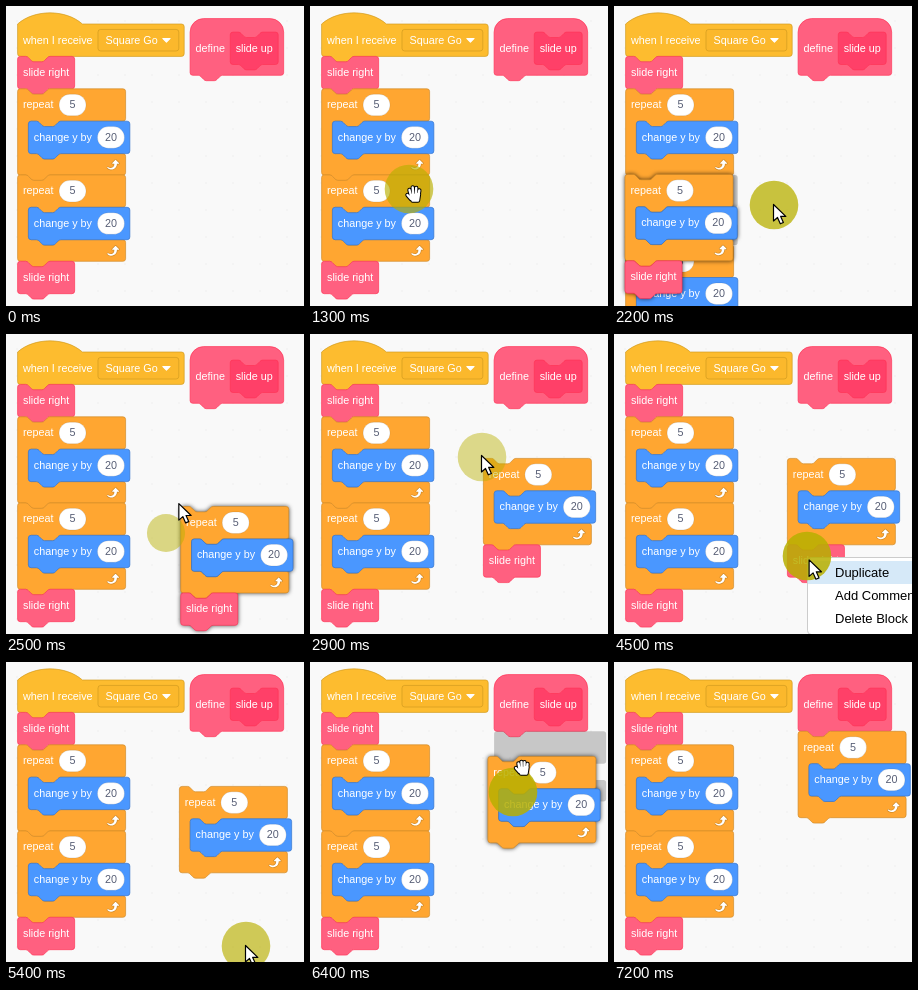
An HTML page for the animation above (9100 ms loop, 298 by 300 pixels).

```html
<!DOCTYPE html>
<html lang="en">
<head>
<meta charset="utf-8">
<title>Block editor</title>
<style>
  html, body { margin: 0; width: 100%; height: 100%; overflow: hidden; background: #f9f9f9; }
  svg { display: block; width: 298px; height: 300px; }
  text { font-family: "Liberation Sans", Arial, sans-serif; font-size: 16px; fill: #fff; }
  .value { fill: #575e75; text-anchor: middle; }
  .menu text { font-size: 13px; fill: #000; }
  .lifted { filter: drop-shadow(0 0 3.5px rgba(0, 0, 0, .7)); }
</style>
</head>
<body>
<svg id="stage" viewBox="0 0 298 300"></svg>
<script>
const LOOP = 9100, STEP = 100, SCALE = 0.675;
const stage = document.getElementById('stage');

const COLORS = {
  event: ['#fdbc2f', '#cf9a20'],
  control: ['#ffa631', '#d08a28'],
  motion: ['#4a97ff', '#3373cc'],
  custom: ['#ff6080', '#ff3355'],
  proto: ['#ff4068', '#ff3355']
};

function add(parent, tag, attrs = {}, content) {
  const el = document.createElementNS('http://www.w3.org/2000/svg', tag);
  for (const key in attrs) el.setAttribute(key, attrs[key]);
  if (content !== undefined) el.textContent = content;
  parent.appendChild(el);
  return el;
}

const place = (el, x, y, scale = 1) =>
  el.setAttribute('transform', `translate(${x} ${y}) scale(${scale})`);
const show = (el, on) => el.setAttribute('visibility', on ? 'visible' : 'hidden');

// Outlines, in unscaled block units
const NOTCH = 'c2 0 3 1 4 2 l4 4 c1 1 2 2 4 2 h12 c2 0 3 -1 4 -2 l4 -4 c1 -1 2 -2 4 -2';
const BUMP = 'c-2 0 -3 1 -4 2 l-4 4 c-1 1 -2 2 -4 2 h-12 c-2 0 -3 -1 -4 -2 l-4 -4 c-1 -1 -2 -2 -4 -2';
const TOP = `M0 4 A4 4 0 0 1 4 0 H12 ${NOTCH}`;
const side = (w, h) => `H${w - 4} a4 4 0 0 1 4 4 v${h - 8} a4 4 0 0 1 -4 4`;
const BOTTOM = `H48 ${BUMP} H4 a4 4 0 0 1 -4 -4 Z`;

const plainPath = w => `${TOP} ${side(w, 48)} ${BOTTOM}`;
const hatPath = w => `M0 0 c25 -22 71 -22 96 0 ${side(w, 48)} ${BOTTOM}`;
const definePath = (w, h) =>
  `M0 20 a20 20 0 0 1 20 -20 H${w - 20} a20 20 0 0 1 20 20 V${h - 4} a4 4 0 0 1 -4 4 ${BOTTOM}`;
const loopPath = (w, inner) =>
  `${TOP} ${side(w, 48)} H64 ${BUMP} h-8 a4 4 0 0 0 -4 4 v${inner - 8} a4 4 0 0 0 4 4 h8 ` +
  `${NOTCH} ${side(w, 32)} ${BOTTOM}`;

const ARROW_EDGE = 'M23.3 11c-.3 .6-.9 1-1.5 1h-1.6c-.1 1.3-.5 2.5-1.1 3.6c-.9 1.7-2.3 3.2-4.1 4.1' +
  'c-1.7 .9-3.6 1.2-5.5 .9c-1.8-.3-3.5-1.1-4.9-2.3c-.7-.7-.7-1.9 0-2.6c.6-.6 1.6-.7 2.3-.2' +
  'c.9 .6 1.9 .9 2.9 .9s1.9-.3 2.7-.9c1.1-.8 1.8-2.1 1.8-3.5h-1.5c-.9 0-1.7-.7-1.7-1.7' +
  'c0-.4 .2-.9 .5-1.2l4.4-4.4c.7-.6 1.7-.6 2.4 0L23 9.2z';
const ARROW = 'M21.8 11h-2.6c0 1.5-.3 2.9-1 4.2c-.8 1.6-2.1 2.8-3.7 3.6c-1.5 .8-3.3 1.1-4.9 .8' +
  'c-1.6-.2-3.2-1-4.4-2.1c-.9-.9 .1-2.1 1.1-1.3c1 .7 2.2 1.1 3.4 1.1s2.3-.3 3.3-1' +
  'c.9-.6 1.6-1.5 2-2.6c.3-.9 .4-1.8 .2-2.8h-2.4c-.7 0-.9-.7-.5-1.1l4.4-4.4' +
  'c.3-.3 .7-.3 .9 0L22 9.8c.5 .5 .2 1.2-.2 1.2z';

function block(parent, x, y, path, color) {
  const g = add(parent, 'g');
  place(g, x, y);
  add(g, 'path', { d: path, fill: COLORS[color][0], stroke: COLORS[color][1] });
  return g;
}

function label(g, str, x = 8, y = 29) {
  add(g, 'text', { x, y }, str);
}

function pill(g, x, value) {
  add(g, 'rect', { x, y: 8, width: 40, height: 32, rx: 16, fill: '#fff', stroke: '#00000026' });
  add(g, 'text', { x: x + 20, y: 29, class: 'value' }, value);
}

function slideBlock(parent, y) {
  const g = block(parent, 0, y, plainPath(84.5), 'custom');
  label(g, 'slide right');
  return g;
}

function repeatBlock(parent, y) {
  const g = block(parent, 0, y, loopPath(160, 48), 'control');
  label(g, 'repeat');
  pill(g, 61.4, 5);
  const icon = add(g, 'g');
  place(icon, 128, 100);
  add(icon, 'path', { d: ARROW_EDGE, fill: COLORS.control[1] });
  add(icon, 'path', { d: ARROW, fill: '#fff' });
  const inner = block(g, 16, 48, plainPath(150.3), 'motion');
  label(inner, 'change y by');
  pill(inner, 102.3, 20);
}

function group(x, y) {
  const g = add(stage, 'g');
  place(g, x, y, SCALE);
  return g;
}

function marker(x, y) {
  const g = group(x, y);
  add(g, 'path', { d: loopPath(166, 24), fill: '#000', opacity: 0.2 });
  return g;
}

function menu(x, y, items) {
  const g = add(stage, 'g', { class: 'menu' });
  place(g, x, y);
  add(g, 'rect', { x: .5, y: .5, width: 208, height: 77, rx: 4, fill: '#fff', stroke: '#ccc' });
  const bar = add(g, 'rect', { x: 1, width: 207, height: 23, fill: '#d6e9f8' });
  items.forEach((item, i) => add(g, 'text', { x: 28, y: 20 + 23 * i }, item));
  return { g, bar, y };
}

// Workspace grid
for (let x = 11; x < 298; x += 27)
  for (let y = 15; y < 300; y += 27)
    add(stage, 'path', { d: `M${x - 1} ${y} h2`, stroke: '#efefef' });

// Main script
const LEFT = 11.6, SPLIT = 168.9;
const main = group(LEFT, 18);
const hat = block(main, 0, 0, hatPath(246.8), 'event');
label(hat, 'when I receive');
add(hat, 'rect', { x: 119.1, y: 8, width: 119.7, height: 32, rx: 4, fill: '#fbb82c', stroke: '#cf9a20' });
label(hat, 'Square Go', 130.3);
add(hat, 'path', {
  d: 'M215 21.5 h11 l-5.5 5.5 z', fill: '#fff', stroke: '#fff', 'stroke-width': 1.5, 'stroke-linejoin': 'round'
});
slideBlock(main, 48);
repeatBlock(main, 96);

const gap = marker(LEFT, SPLIT);
const lower = group(LEFT, SPLIT);
repeatBlock(lower, 0);
slideBlock(lower, 128);

// Definition
const define = group(184.1, 12.6);
const head = block(define, 0, 0, definePath(138.6, 84), 'custom');
label(head, 'define', 8, 49);
label(block(head, 59.5, 20, plainPath(71), 'proto'), 'slide up');
const slot = marker(184.1, 69.3);

// Duplicated blocks
const copy = group(0, 0);
repeatBlock(copy, 0);
const copyTail = slideBlock(copy, 128);

const menus = [
  { ...menu(99, 183, ['Duplicate', 'Add Comment', 'Delete 2 Blocks']), from: 1400, to: 2100 },
  { ...menu(193, 223, ['Duplicate', 'Add Comment', 'Delete Block']), from: 4400, to: 5400 }
];

const ripple = add(stage, 'circle', { fill: '#b8b000' });

const pointer = add(stage, 'g');
const arrow = add(pointer, 'path', {
  d: 'M-.5 -.5 V16 L3.5 12.5 L6.3 18.8 L9.4 17.5 L6.7 11.4 H11.8 Z',
  fill: '#fff', stroke: '#000', 'stroke-width': 1.2, 'stroke-linejoin': 'round'
});

function hand(d) {
  const g = add(pointer, 'g', { transform: 'translate(5 5)', 'stroke-linecap': 'round', 'stroke-linejoin': 'round' });
  for (const [color, width] of [['#000', 4.4], ['#fff', 2.4]])
    add(g, 'path', { d, fill: color, stroke: color, 'stroke-width': width });
  return g;
}
const PALM = 'M-3 1 L5 0 L4 6.5 H-1.5 Z M-3 5 L-6.5 1';
const openHand = hand(PALM + ' M-3 2 L-4.5 -4 M-.8 0 L-1.3 -6.5 M2 0 L2.2 -6 M4.5 1 L5.3 -3.5');
const fist = hand(PALM + ' M-3 2 L-4 -3.5 M-.8 0 L-1 -5 M2 0 V-4.7 M4.5 1 L5 -3');

// Pointer stops: time, x, y
const STOPS = [
  [500, 290, 282], [1200, 99, 183], [1400, 99, 183], [1900, 160, 199], [2300, 160, 199],
  [2600, 178, 160], [2800, 172, 122], [3000, 172, 122], [3600, 193, 223], [4400, 193, 223],
  [5100, 240, 284], [5400, 240, 284], [5900, 203, 130], [6200, 203, 130], [6300, 205, 115],
  [6400, 207.5, 100], [6600, 213, 78], [6700, 213, 78], [7200, 330, 95]
];
// Presses: time, x, y
const PRESSES = [
  [1200, 99, 183], [2050, 160, 199], [2900, 172, 123], [4300, 193, 222], [5300, 240, 284], [6200, 203, 130]
];

const within = (t, from, to) => t >= from && t < to;

function pointerAt(t) {
  const i = STOPS.findIndex(s => s[0] > t);
  if (i < 1) return STOPS[i < 0 ? STOPS.length - 1 : 0].slice(1);
  const [t0, x0, y0] = STOPS[i - 1], [t1, x1, y1] = STOPS[i];
  const p = (t - t0) / (t1 - t0), e = p * p * (3 - 2 * p);
  return [x0 + (x1 - x0) * e, y0 + (y1 - y0) * e];
}

function copyAt(t, x, y) {
  if (t < 2400) return [11, 168.4];
  if (t < 2900) return [x + 1.4, y + 2.4];
  if (t < 6200) return [173.4, 124.4];
  if (t < 6700) return [x - 29.6, y - 5.6];
  return [184.1, 69.3];
}

function draw(time) {
  const t = Math.floor((time % LOOP) / STEP) * STEP;
  const [x, y] = pointerAt(t);

  const pushed = within(t, 2200, 2400);
  show(gap, pushed);
  place(lower, LEFT, SPLIT + (pushed ? 70.2 : 0), SCALE);
  show(slot, within(t, 6300, 6700));

  show(copy, t >= 2200);
  show(copyTail, within(t, 2200, 5400));
  place(copy, ...copyAt(t, x, y), SCALE);
  copy.setAttribute('class', within(t, 2200, 2900) || within(t, 6200, 6700) ? 'lifted' : '');

  for (const m of menus) {
    show(m.g, within(t, m.from, m.to));
    const row = Math.max(0, Math.min(2, Math.floor((y - m.y - 4) / 23)));
    m.bar.setAttribute('y', 4 + 23 * row);
  }

  const press = PRESSES.find(p => within(t, p[0], p[0] + 600));
  show(ripple, !!press);
  if (press) {
    const age = t - press[0], fade = Math.max(0, age - 300);
    ripple.setAttribute('cx', press[1]);
    ripple.setAttribute('cy', press[2]);
    ripple.setAttribute('r', 24.3 - fade * 0.035);
    ripple.setAttribute('opacity', Math.min(0.85, 0.45 + age * 0.002) - fade * 0.0025);
  }

  const visible = within(t, 500, 7200);
  const gripping = within(t, 6200, 6700);
  const hovering = within(t, 1100, 1400) || within(t, 3100, 4400) ||
    within(t, 5700, 6200) || within(t, 6700, 6900);
  place(pointer, x, y);
  show(arrow, visible && !gripping && !hovering);
  show(openHand, hovering);
  show(fist, gripping);
}

const start = performance.now();
function tick() {
  draw(performance.now() - start);
  requestAnimationFrame(tick);
}
tick();
</script>
</body>
</html>
```
